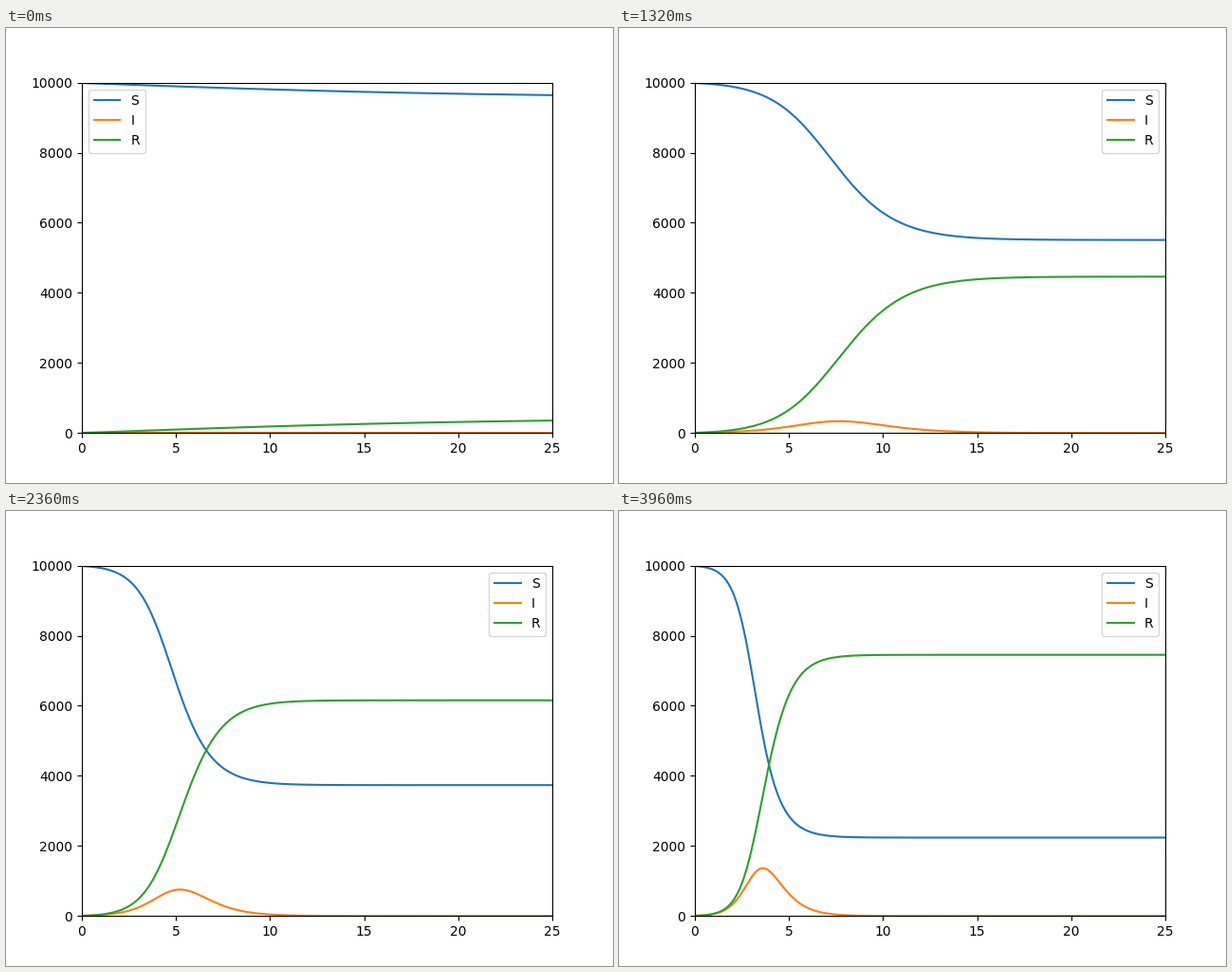
Animation, 640 px wide and 480 px high, one loop 4 s. Source, as a matplotlib script:

```python
import numpy as np
import matplotlib.pyplot as plt
from matplotlib.animation import FuncAnimation

FRAMES = 100
STEPS = 250
DT = 0.1
GAMMA = 2.0
N = 10000
I0 = 10


def simulate(beta):
    """Step the epidemic for every infection rate at once."""
    b, g = beta * DT, GAMMA * DT
    s = np.full(beta.shape, 1 - I0 / N)
    i = np.full(beta.shape, I0 / N)
    r = np.zeros(beta.shape)
    states = [(s, i, r)]
    for _ in range(STEPS):
        ahead = i * (1 + b * s - g)
        s = s * np.exp(-b * (i + ahead) / 2)
        i = i * (1 + b * s - g)
        r = r + g * i
        states.append((s, i, r))
    return N * np.array(states)


days = np.linspace(0, 25, STEPS + 1)
runs = simulate(np.linspace(2, 4, FRAMES))

fig, ax = plt.subplots(figsize=(6.4, 4.8), dpi=100)


def draw(frame):
    ax.clear()
    for k, name in enumerate("SIR"):
        ax.plot(days, runs[:, k, frame], label=name)
    ax.set_xlim(0, 25)
    ax.set_ylim(0, N)
    ax.legend(loc="best")
    return ax.lines


anim = FuncAnimation(fig, draw, frames=FRAMES, interval=40,
                     init_func=lambda: draw(0), repeat=True, repeat_delay=0)
plt.show()
```
